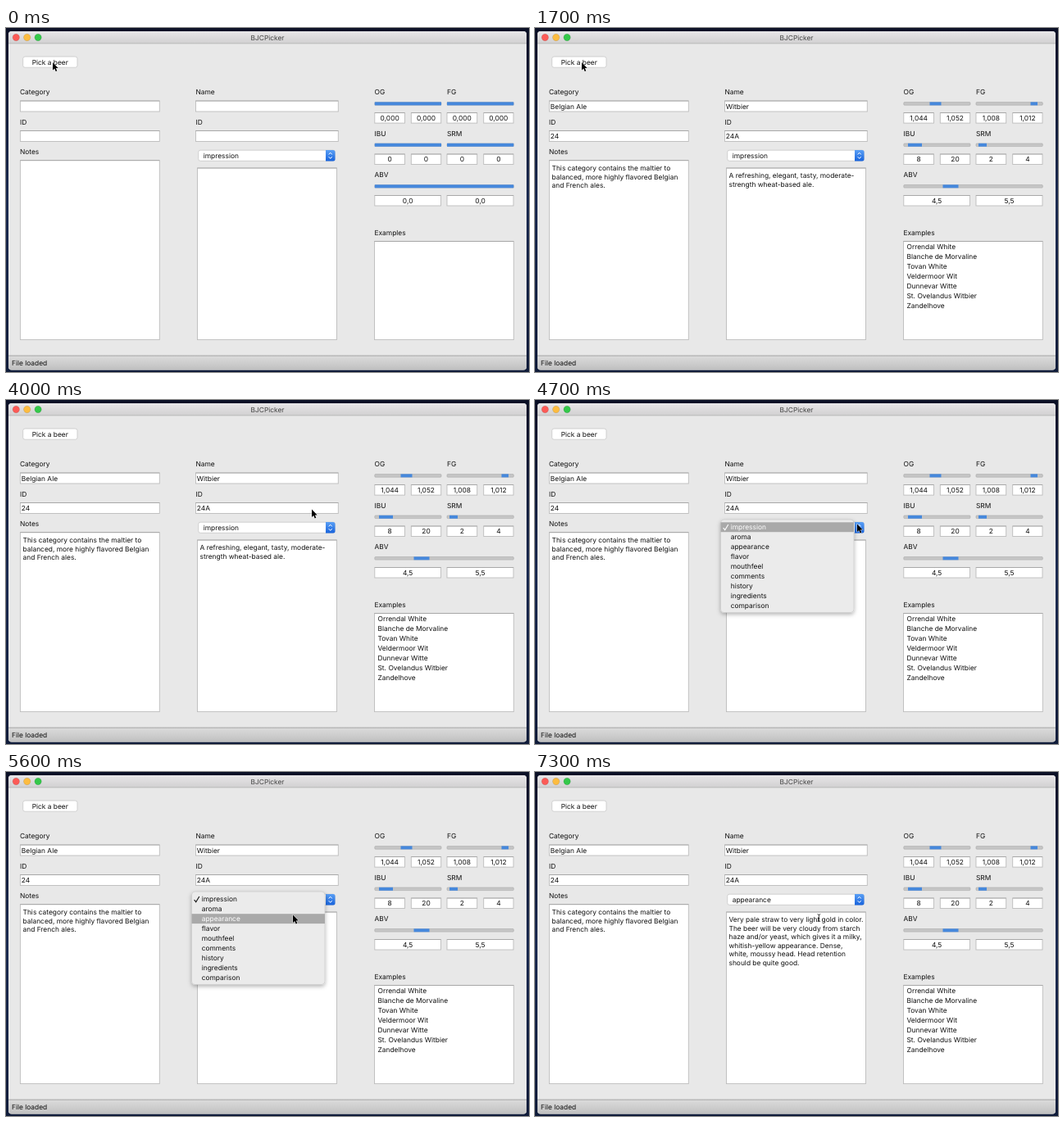
These frames come from a looping animation (638x420 px, 8 s). An HTML page:

```html
<!DOCTYPE html>
<html lang="en">
<head>
<meta charset="utf-8">
<title>BJCPicker</title>
<style>
  html, body { margin: 0; width: 100%; height: 100%; overflow: hidden; background: #101a36; }
  svg { display: block; width: 638px; height: 420px; }
  text { font: 8.4px Inter, "Open Sans", sans-serif; fill: #111; white-space: pre; text-rendering: geometricPrecision; }
</style>
</head>
<body>
<svg id="stage" viewBox="0 0 638 420">
  <defs>
    <linearGradient id="desk" x2="0" y2="1"><stop stop-color="#0b1026"/><stop offset=".5" stop-color="#1b2a50"/><stop offset="1" stop-color="#101c3a"/></linearGradient>
    <linearGradient id="titleBar" x2="0" y2="1"><stop stop-color="#e8e6e8"/><stop offset="1" stop-color="#d1d0d1"/></linearGradient>
    <linearGradient id="statusBar" x2="0" y2="1"><stop stop-color="#dcdcdc"/><stop offset="1" stop-color="#c0c0c0"/></linearGradient>
    <linearGradient id="blue" x2="0" y2="1"><stop stop-color="#5a9ff5"/><stop offset="1" stop-color="#1763dc"/></linearGradient>
    <filter id="shadow" x="-10%" y="-10%" width="120%" height="125%"><feDropShadow dx="0" dy="2" stdDeviation="2.5" flood-opacity=".3"/></filter>
  </defs>
</svg>
<script>
const NS = 'http://www.w3.org/2000/svg';
const LOOP = 8000, STEP = 100;
const stage = document.getElementById('stage');

function add(tag, attrs, parent = stage) {
  const node = document.createElementNS(NS, tag);
  for (const key in attrs) node.setAttribute(key, attrs[key]);
  return parent.appendChild(node);
}
const group = (parent = stage) => add('g', {}, parent);
const show = (node, on) => node.setAttribute('visibility', on ? 'visible' : 'hidden');

function rect(x1, y1, x2, y2, fill, more = {}, parent) {
  return add('rect', { x: x1, y: y1, width: x2 - x1, height: y2 - y1, fill, ...more }, parent);
}
// cy is the visual middle of the line
function label(x, cy, string, parent, anchor = 'start') {
  const node = add('text', { x, y: cy + 3, 'text-anchor': anchor }, parent);
  node.textContent = string;
  return node;
}
function lines(x, cy, pitch, strings, parent) {
  strings.forEach((s, i) => label(x, cy + i * pitch, s, parent));
}
function field(x1, y1, x2, y2) {
  rect(x1, y1, x2, y2, '#fff', { stroke: '#bcbcbc', 'stroke-width': .9 });
  rect(x1, y1 - .4, x2, y1 + .4, '#a2a2a2');
}

// Window
rect(0, 0, 638, 420, 'url(#desk)');
rect(3, 4, 635, 417.5, '#e8e8e8', { rx: 4 });
add('path', { d: 'M3 19V8a4 4 0 0 1 4-4H631a4 4 0 0 1 4 4V19Z', fill: 'url(#titleBar)' });
rect(3, 18.5, 635, 19.3, '#b4b3b4');
add('path', { d: 'M3 400H635V413.5a4 4 0 0 1-4 4H7a4 4 0 0 1-4-4Z', fill: 'url(#statusBar)' });
rect(3, 399.6, 635, 400.6, '#a4a4a4');
['#fc5b57', '#fdbc40', '#34c84a'].forEach((fill, i) =>
  add('circle', { cx: 12.3 + i * 13.4, cy: 11.5, r: 4.2, fill, stroke: '#0003', 'stroke-width': .5 }));
label(319, 11.8, 'BJCPicker', stage, 'middle').style.fill = '#454545';
label(7, 408.5, 'File loaded');

// Button
const button = rect(20.7, 35, 87, 48.2, '#fff', { rx: 2.5, stroke: '#c2c2c2', 'stroke-width': .7 });
const buttonText = label(53.8, 41.7, 'Pick a beer', stage, 'middle');

// Columns
[[17, 78, 'Category'], [17, 114.5, 'ID'], [17, 151, 'Notes'],
 [231.5, 78, 'Name'], [231.5, 114.5, 'ID'],
 [449.5, 78, 'OG'], [538, 78, 'FG'], [449.5, 128.5, 'IBU'], [538, 128.5, 'SRM'],
 [449.5, 179, 'ABV'], [449.5, 249.5, 'Examples']].forEach(args => label(...args));
for (const top of [89, 125.5]) {
  field(17.4, top, 187.3, top + 13);
  field(231.5, top, 405.3, top + 13);
}
field(17.4, 161.7, 187.3, 380.6);
field(233.5, 171, 403.5, 380.6);
field(449.5, 260.4, 619.3, 380.6);

// Combo box
rect(234.7, 149.2, 401.4, 162.3, '#fff', { rx: 2.5, stroke: '#c2c2c2', 'stroke-width': .7 });
add('path', { d: 'M390 149H399a2.5 2.5 0 0 1 2.5 2.5V160a2.5 2.5 0 0 1-2.5 2.5H390Z', fill: 'url(#blue)' });
add('path', { d: 'M393.7 154.4L395.7 152.2L397.7 154.4M393.7 157.2L395.7 159.4L397.7 157.2', fill: 'none', stroke: '#fff', 'stroke-width': 1 });
const comboText = label(240.7, 155.6, '');

// Content that appears after the pick
const emptyStats = group(), result = group();

function stat(x1, x2, top, boxes, from, to, before, after) {
  rect(x1, top, x2, top + 3.6, '#c6c6c6', { rx: 1, stroke: '#a9a9a9', 'stroke-width': .6 }, group());
  rect(x1, top - .2, x2, top + 3.8, '#4688dc', {}, emptyStats);
  rect(from, top - .2, to, top + 3.8, '#4688dc', {}, result);
  boxes.forEach(([left, right], i) => {
    field(left, top + 13, right, top + 25.5);
    const middle = (left + right) / 2;
    label(middle, top + 19.4, before, emptyStats, 'middle');
    label(middle, top + 19.4, after[i], result, 'middle');
  });
}
const leftPair = [[449.8, 486.5], [494.3, 530.7]], rightPair = [[538, 574.7], [582.7, 619]];
const widePair = [[449.8, 530.5], [538, 619]];
stat(449.8, 531, 90.6, leftPair, 481.5, 495.5, '0,000', ['1,044', '1,052']);
stat(538, 619.3, 90.6, rightPair, 604.5, 613, '0,000', ['1,008', '1,012']);
stat(449.8, 531, 141, leftPair, 455, 472, '0', ['8', '20']);
stat(538, 619.3, 141, rightPair, 541, 551, '0', ['2', '4']);
stat(449.8, 619.3, 191.5, widePair, 497.5, 516.5, '0,0', ['4,5', '5,5']);
stage.append(emptyStats, result);

label(18.8, 96, 'Belgian Ale', result);
label(18.8, 132.3, '24', result);
label(232.8, 96, 'Witbier', result);
label(232.8, 132.3, '24A', result);
lines(20.5, 171, 10.6, ['This category contains the maltier to', 'balanced, more highly flavored Belgian', 'and French ales.'], result);
lines(453.5, 267.3, 11.9, ['Orrendal White', 'Blanche de Morvaline', 'Tovan White', 'Veldermoor Wit',
  'Dunnevar Witte', 'St. Ovelandus Witbier', 'Zandelhove'], result);

const impression = group(), appearance = group();
lines(236.5, 180, 10.6, ['A refreshing, elegant, tasty, moderate-', 'strength wheat-based ale.'], impression);
lines(236.5, 180, 10.6, ['Very pale straw to very light gold in color.', 'The beer will be very cloudy from starch',
  'haze and/or yeast, which gives it a milky,', 'whitish-yellow appearance. Dense,',
  'white, moussy head. Head retention', 'should be quite good.'], appearance);

// Popup menu
const menu = group();
rect(226.5, 146, 389, 259.5, '#ebebeb', { rx: 4, filter: 'url(#shadow)', stroke: '#c4c4c4', 'stroke-width': .6 }, menu);
const highlight = rect(226.5, 149.3, 389, 161.2, '#a9a9a9', {}, menu);
const items = ['impression', 'aroma', 'appearance', 'flavor', 'mouthfeel', 'comments', 'history', 'ingredients', 'comparison']
  .map((name, i) => label(238.7, 155.4 + i * 11.95, name, menu));
const check = add('path', { d: 'M229.6 156L231.7 158.7L235.8 152', fill: 'none', 'stroke-width': 1.1 }, menu);

// Pointers
const arrow = add('path', { d: 'M0 0V9.6L2.2 7.6L3.7 11L5.3 10.3L3.8 7H6.7Z', fill: '#000', stroke: '#fff', 'stroke-width': .8, 'paint-order': 'stroke' });
const beam = add('path', { d: 'M344.6 173.6Q346.4 173.6 346.4 175V181Q346.4 182.4 344.6 182.4M348.2 173.6Q346.4 173.6 346.4 175M346.4 181Q346.4 182.4 348.2 182.4M345.3 179H347.5', fill: 'none', stroke: '#222', 'stroke-width': .8 });

const path = [[0, 57, 42], [3200, 57, 42], [4000, 373, 133.5], [4300, 393, 151.5],
  [5200, 393, 151.5], [5600, 350, 174.5], [5800, 347, 176.5], [LOOP, 347, 176.5]];

function pointerAt(t) {
  const i = path.findIndex(p => p[0] > t);
  const [t0, x0, y0] = path[i - 1], [t1, x1, y1] = path[i];
  const u = (t - t0) / (t1 - t0), s = u * u * (3 - 2 * u);
  return [x0 + (x1 - x0) * s, y0 + (y1 - y0) * s];
}

function update(t) {
  const pressed = t >= 1200 && t < 1700;
  button.setAttribute('fill', pressed ? 'url(#blue)' : '#fff');
  buttonText.style.fill = pressed ? '#fff' : '#111';

  const picked = t >= 1700, chosen = t >= 6800;
  show(emptyStats, !picked);
  show(result, picked);
  show(impression, picked && !chosen);
  show(appearance, chosen);
  comboText.textContent = chosen ? 'appearance' : 'impression';

  const [x, y] = pointerAt(t);
  const row = Math.max(0, Math.floor((y - 149.3) / 11.95));
  const blink = t >= 6700 && t < 6800;
  menu.style.display = t >= 4400 && t < 6900 ? '' : 'none';
  menu.setAttribute('opacity', chosen ? .4 : 1);
  highlight.setAttribute('y', 149.3 + row * 11.95);
  highlight.style.display = blink ? 'none' : '';
  items.forEach((item, i) => item.style.fill = i === row && !blink ? '#fff' : '#111');
  check.setAttribute('stroke', row === 0 ? '#fff' : '#111');

  arrow.setAttribute('transform', `translate(${x} ${y})`);
  show(arrow, t < 6900);
  show(beam, t >= 6900);
}

const start = performance.now();
function tick() {
  const t = (performance.now() - start) % LOOP;
  update(Math.floor(t / STEP) * STEP);
  requestAnimationFrame(tick);
}
tick();
</script>
</body>
</html>
```
